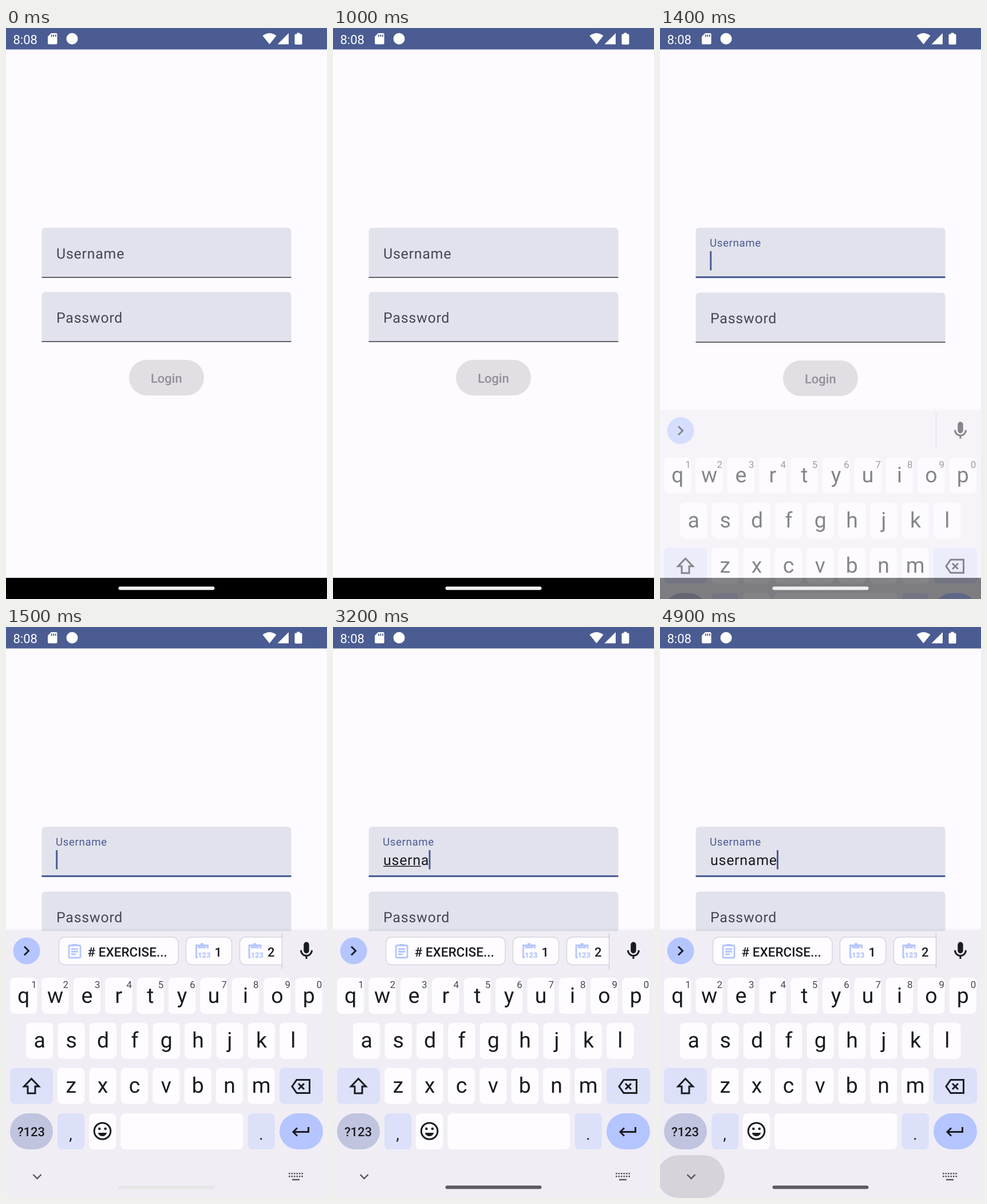
These frames come from a looping animation (561x998 px, 5000 ms). An HTML page:

```html
<!DOCTYPE html>
<html lang="en">
<head>
<meta charset="utf-8">
<title>Login form with on-screen keyboard</title>
<style>
  html, body { margin: 0; width: 100%; height: 100%; overflow: hidden; background: #fdfbff; }
  svg { display: block; width: 561px; height: 998px; font-family: Roboto, sans-serif; text-rendering: geometricPrecision; }
  .large { font-size: 24.9px; letter-spacing: .78px; }
  .small { font-size: 18.7px; letter-spacing: .62px; fill: #4a5c92; }
  .medium { font-size: 22px; font-weight: 500; }
  .letter { font-size: 37.5px; text-anchor: middle; }
  .digit { font-size: 17px; text-anchor: middle; fill: #45464f; }
  .line { fill: none; stroke: #1a1b21; stroke-width: 3; }
  .chip { fill: #fefcff; stroke: #d8d6de; stroke-width: 1.5; }
  .clip { fill: none; stroke: #b4c5ff; stroke-width: 2.8; }
</style>
</head>
<body>
<svg viewBox="0 0 561 998">
  <defs>
    <linearGradient id="shade" x1="0" y1="0" x2="0" y2="1">
      <stop offset="0" stop-color="#000" stop-opacity="0"/>
      <stop offset="1" stop-color="#000" stop-opacity=".06"/>
    </linearGradient>
    <clipPath id="strip"><path d="M0 530H482V600H0z"/></clipPath>
    <path id="field" d="M62.5 87.5V6.5q0-6.5 6.5-6.5H492q6.5 0 6.5 6.5V87.5z" fill="#e1e2ec"/>
  </defs>
  <rect width="561" height="998" fill="#fdfbff"/>

  <!-- Status bar -->
  <rect width="561" height="37.5" fill="#4a5c92"/>
  <g fill="#fff">
    <text x="12.5" y="27.5" font-size="22">8:08</text>
    <path d="M79 9H87.500q2 0 2 2V26.500q0 2-2 2H75q-2 0-2-2V15z"/>
    <path d="M79.700 11.500v4M83.200 11.500v4M86.700 11.500v4" stroke="#4a5c92" stroke-width="1.800"/>
    <circle cx="115.500" cy="18.700" r="10"/>
    <path d="M448.500 13.500Q460.500 4.500 472.500 13.500L460.500 28.500z"/>
    <path d="M494 9V28.500H474.500z"/>
    <path d="M508.500 8.500h5v2h2q2 0 2 2V27q0 2-2 2h-9q-2 0-2-2V12.500q0-2 2-2h2z"/>
  </g>

  <!-- Form -->
  <use href="#field" y="349.3"/>
  <text id="hint" class="large" x="88" y="403.3" fill="#45464f">Username</text>
  <rect id="rule" x="62.5" width="436" fill="#45404c"/>
  <g id="focused">
    <text class="small" x="87" y="382.3">Username</text>
    <text id="input" class="large" x="88" y="416.3" fill="#1a1b21"></text>
    <rect id="underline" x="88" y="417.5" height="1.5" fill="#1a1b21"/>
    <rect id="caret" y="390" width="3" height="33.500" fill="#4a5c92"/>
  </g>
  <g id="lower">
    <use href="#field" y="461.5"/>
    <rect x="62.5" y="547.3" width="436" height="1.600" fill="#45404c"/>
    <text class="large" x="88" y="515.3" fill="#45464f">Password</text>
    <rect x="215" y="580" width="131" height="62.300" rx="31.150" fill="#e1dfe4"/>
    <text class="medium" x="280.300" y="619.800" text-anchor="middle" fill="#929096">Login</text>
  </g>

  <rect y="961" width="561" height="37" fill="#000"/>

  <!-- Keyboard -->
  <g id="keyboard" fill="#1a1b21">
    <rect y="526" width="561" height="6" fill="url(#shade)"/>
    <rect y="531.500" width="561" height="467" fill="#f0edf5"/>
    <circle cx="36" cy="566" r="23.500" fill="#b4c5ff"/>
    <path class="line" d="M32 558.500l7.500 7.500-7.500 7.500"/>
    <g id="chips" clip-path="url(#strip)">
      <rect class="chip" x="92.500" y="542" width="208.500" height="48.500" rx="10"/>
      <rect class="chip" x="314.500" y="542" width="80" height="48.500" rx="10"/>
      <rect class="chip" x="408.500" y="542" width="95" height="48.500" rx="10"/>
      <g class="clip">
        <rect x="110" y="556.500" width="20" height="21.500" rx="2"/>
        <path d="M116 555.500h8M114 563h12M114 567.500h12M114 572h8"/>
        <path id="numbers" d="M332.500 560V577.500H335M332.500 564V556.500H352.500V562M337 556V560H348V556M340 554h5"/>
        <use href="#numbers" x="92.500"/>
      </g>
      <g fill="#b4c5ff" font-size="13" font-weight="900">
        <text x="335" y="577.500">123</text><text x="427.500" y="577.500">123</text>
      </g>
      <g class="medium">
        <text x="142.500" y="575.500" font-size="22.500"># EXERCISE...</text>
        <text x="364.500" y="575.500">1</text><text x="457" y="575.500">2</text>
      </g>
    </g>
    <path d="M482.500 534.500V598" stroke="#cfccd5" stroke-width="1.300"/>
    <rect x="520.300" y="550.500" width="9.400" height="20" rx="4.700"/>
    <path class="line" d="M515.500 565a9.500 9.500 0 0 0 19 0M525 574.500V580"/>
    <g id="keys"></g>
    <path class="line" d="M44.500 789.500l13 13.500H51v12H38v-12H31.500z"/>
    <path class="line" d="M508 791.500H530.500V814.500H508L500 803zM511 798l10 10M521 798l-10 10"/>
    <path class="line" d="M528.500 874V882.500H503M509 875.500l-7 7 7 7"/>
    <circle class="line" cx="168.500" cy="881" r="14.300"/>
    <circle cx="163.300" cy="877" r="2.300"/><circle cx="173.700" cy="877" r="2.300"/>
    <path d="M160.500 884h16q-2.500 6-8 6t-8-6z"/>
    <text class="medium" x="44" y="889.800" text-anchor="middle">?123</text>
    <text x="113" y="896" text-anchor="middle" font-size="28">,</text>
    <text x="446" y="896" text-anchor="middle" font-size="28">.</text>
    <rect id="ripple" x="-5" y="923" width="118" height="75" rx="37.500" fill="#000"/>
    <g fill="none" stroke="#55545c" stroke-width="2.400">
      <path d="M47.500 957l7 7 7-7"/>
      <path d="M494 955.300H519M494 960.300H519" stroke-dasharray="2.600 1.880"/>
      <path d="M500 966H513"/>
    </g>
  </g>
  <rect id="pill" x="196.500" y="976.300" width="168" height="6" rx="3"/>
</svg>
<script>
const LOOP = 5000, STEP = 100, FOCUS = 1300, KEYBOARD_HEIGHT = 466;
const $ = id => document.getElementById(id);
const clamp = v => Math.max(0, Math.min(1, v));
const show = (id, on) => $(id).style.display = on ? '' : 'none';
const set = (id, attrs) => {
  for (const name in attrs) $(id).setAttribute(name, attrs[name]);
};

const key = (x, y, width, fill = '#fefcff', rx = 8) =>
  `<rect x="${x}" y="${y}" width="${width}" height="63" rx="${rx}" fill="${fill}"/>`;

function buildKeys() {
  const rows = [['qwertyuiop', 7, 613], ['asdfghjkl', 35, 691.7], ['zxcvbnm', 90, 770.5]];
  let out = '';
  rows.forEach(([letters, left, top], row) => [...letters].forEach((letter, i) => {
    const x = left + i * 55.4;
    out += key(x, top, 47.3) + `<text class="letter" x="${x + 23.7}" y="${top + 43.5}">${letter}</text>`;
    if (row === 0) out += `<text class="digit" x="${x + 42}" y="631">${(i + 1) % 10}</text>`;
  }));
  const tint = '#dce1f9';
  return out + key(7, 770.5, 75, tint) + key(478, 770.5, 76, tint)
    + key(7, 850, 75, '#c0c4de', 31.5) + key(90, 850, 47.3, tint)
    + key(145, 850, 47.3) + key(200.3, 850, 214) + key(422.5, 850, 47.3, tint)
    + key(478, 850, 76, '#b4c5ff', 31.5);
}

// [time, typed letters, underlined letters]
const typing = [
  [0, 0, 0], [2000, 1, 0], [2200, 2, 0], [2500, 3, 0], [2700, 3, 3], [3000, 5, 5],
  [3200, 6, 5], [3300, 6, 6], [3500, 8, 8], [4700, 8, 0]
];

function render(t) {
  const focused = t >= FOCUS;
  show('hint', !focused);
  show('focused', focused);
  set('rule', focused ? { y: 434, height: 3.1, fill: '#4a5c92' }
                      : { y: 435, height: 1.6, fill: '#45404c' });
  set('lower', { transform: `translate(0 ${focused ? 1 : 0})` });

  const [, typed, underlined] = typing.filter(([start]) => start <= t).pop();
  const input = $('input');
  input.textContent = 'username'.slice(0, typed);
  const widthOf = n => n ? input.getSubStringLength(0, n) : 0;
  set('underline', { width: widthOf(underlined) });
  set('caret', { x: 87.2 + widthOf(typed) });
  show('caret', !(t >= 1800 && t < 2000) && !(t >= 4000 && t < 4500));

  const rise = clamp((t - 1250) / 250);
  show('keyboard', focused);
  show('chips', t >= 1500);
  set('keyboard', {
    transform: `translate(0 ${KEYBOARD_HEIGHT * (1 - rise) ** 1.33})`,
    opacity: rise ** 1.27
  });
  set('ripple', { opacity: 0.11 * clamp((t - 4600) / 300) });

  const darken = clamp((t - 1350) / 1600);
  const grey = Math.round(244 - 151 * darken);
  set('pill', { fill: `rgb(${grey} ${grey - 2 * darken} ${grey + 3 * darken})` });
}

$('keys').innerHTML = buildKeys();
const start = performance.now();
function frame() {
  const t = (performance.now() - start) % LOOP;
  render(Math.floor(t / STEP) * STEP);
  requestAnimationFrame(frame);
}
frame();
</script>
</body>
</html>
```
